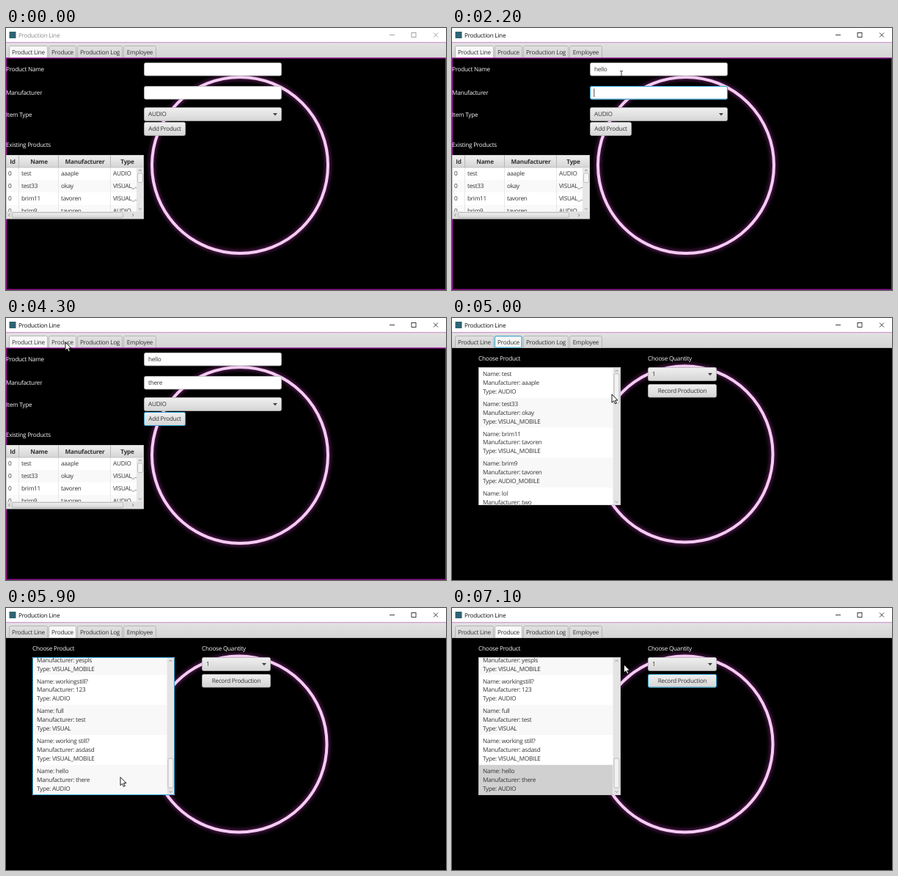
Write an HTML page that moves like this. It is 600 by 357 pixels and loops after 7.2 s.

```html
<!DOCTYPE html>
<html lang="en">
<head>
<meta charset="utf-8">
<title>Production Line</title>
<style>
  html, body { margin: 0; width: 100%; height: 100%; overflow: hidden; background: #000; }
  #stage { display: block; width: 100vw; height: 100vh; }
  text { font: 8.2px "Open Sans", "Noto Sans", sans-serif; letter-spacing: -.25px; fill: #333;
    white-space: pre; text-rendering: geometricPrecision; }
  .light { fill: #f4f4f4; }
  .bold { font-weight: 700; }
  .mid { text-anchor: middle; }
  .ring { fill: none; stroke: #f5cdf2; stroke-width: 4; filter: drop-shadow(0 0 3px #a436a0); }
  .focus { fill: none; stroke: #2aa5d4; stroke-width: 1; }
</style>
</head>
<body>
<svg id="stage" viewBox="0 0 600 357" preserveAspectRatio="none">
  <defs>
    <linearGradient id="btn" x2="0" y2="1"><stop stop-color="#f0f0f0"/><stop offset="1" stop-color="#d5d5d5"/></linearGradient>
    <linearGradient id="btnHover" x2="0" y2="1"><stop stop-color="#fafafa"/><stop offset="1" stop-color="#e2e2e2"/></linearGradient>
    <linearGradient id="bar" x2="0" y2="1"><stop stop-color="#e2e2e2"/><stop offset="1" stop-color="#d4d4d4"/></linearGradient>
    <linearGradient id="tab" x2="0" y2="1"><stop stop-color="#e0e0e0"/><stop offset="1" stop-color="#d4d4d4"/></linearGradient>
  </defs>
</svg>
<script>
const LOOP = 7200, STEP = 100;
const stage = document.getElementById('stage');
const el = id => document.getElementById(id);
const show = (id, on) => el(id).setAttribute('display', on ? 'inline' : 'none');
const set = (id, name, value) => el(id).setAttribute(name, value);

// ---- markup helpers ----
const text = (x, y, s, cls = '', id = '') => `<text x="${x}" y="${y}" class="${cls}" id="${id}">${s}</text>`;
const rect = (x, y, w, h, fill, more = '') => `<rect x="${x}" y="${y}" width="${w}" height="${h}" fill="${fill}" ${more}/>`;
const line = (d, color, width = 1, more = '') => `<path d="${d}" fill="none" stroke="${color}" stroke-width="${width}" ${more}/>`;
const clip = (x, y, w, h, body) => `<svg x="${x}" y="${y}" width="${w}" height="${h}" viewBox="${x} ${y} ${w} ${h}">${body}</svg>`;
const box = (x, y, w, h, fill, id = '') => rect(x + .5, y + .5, w - 1, h - 1, fill, `rx="2" stroke="#b4b4b4" stroke-width=".8" id="${id}"`);
const halo = (x, y, w, h, id) => rect(x + .5, y + .5, w - 1, h - 1, 'none', `rx="2" class="focus" id="${id}"`);
const chevron = (x, y, dx, dy) => line(dx
  ? `M${x - dx},${y - 2}l${2 * dx},2l${-2 * dx},2`
  : `M${x - 2},${y - dy}l2,${2 * dy}l2,${-2 * dy}`, '#777', .8);
const combo = (x, y, w, h, s) => box(x, y, w, h, 'url(#btn)') + text(x + 6, y + 12.3, s) +
  `<path d="M${x + w - 12},${y + 8}h6l-3,3.6z" fill="#444"/>`;
const button = (x, y, w, h, s, id) => box(x, y, w, h, 'url(#btn)', id) +
  halo(x, y, w, h, id + 'Focus') + text(x + w / 2, y + 12.2, s, 'mid');

// ---- window chrome ----
const TABS = [['Product Line', 4, 53], ['Produce', 58, 38], ['Production Log', 97, 62], ['Employee', 160, 45]];

const chrome = () => rect(0, 0, 600, 19, '#fff') + rect(0, 20, 600, 21, 'url(#bar)') +
  rect(0, 19, 600, 1.3, '#d39fd4') +
  rect(4.5, 5, 9, 9, '#2f6374') + text(17, 12.5, 'Production Line', '', 'title') +
  `<g id="winBtns" fill="none" stroke-width=".8"><path d="M523,9.5h7M583,6.5l6,6M589,6.5l-6,6"/><rect x="553" y="6.5" width="6" height="6"/></g>` +
  line('M0,40.5H600', '#b5b5b5') +
  TABS.map(([name, x, w], i) =>
    `<path id="tab${i}" d="M${x + .5},40.5v-14q0,-2 2,-2h${w - 5}q2,0 2,2v14" stroke="#b2b2b2" stroke-width=".9"/>` +
    text(x + w / 2, 36, name, 'mid')).join('') +
  rect(58.5, 24.8, 36.5, 15.4, 'none', 'rx="1.5" class="focus" id="tabFocus"');

// ---- first page ----
const ROWS = [['test', 'aaaple', 'AUDIO'], ['test33', 'okay', 'VISUAL_...'],
  ['brim11', 'tavoren', 'VISUAL_...'], ['brim9', 'tavoren', 'AUDIO_...']];
const COLS = [['Id', 0, 18], ['Name', 18, 54], ['Manufacturer', 72, 71], ['Type', 143, 45]];
const FIELDS = [47, 79];

function table() {
  const head = COLS.map(([name, x, w]) => text(x + w / 2, 184.7, name, 'mid bold') +
    line(`M${x + w - .5},173V190`, '#b8b8b8')).join('');
  const rows = ROWS.map((row, i) => {
    const y = 190 + i * 17;
    return rect(0, y, 178, 17, i % 2 ? '#f9f9f9' : '#fff') +
      line(`M17.5,${y}v17M71.5,${y}v17M142.5,${y}v17`, '#e8e8e8') +
      ['0', ...row].map((s, c) => text(COLS[c][1] + 3, y + 11, s)).join('');
  }).join('');
  return rect(0, 173, 188, 87, '#fff') + rect(0, 173, 188, 17, 'url(#btn)') + head +
    clip(0, 190, 178, 60, rows) + line('M0,190H188', '#b8b8b8', .8) +
    rect(178, 190, 10, 60, '#e6e6e6') + rect(179.5, 198, 7, 12.5, '#f4f4f4', 'rx="1.5" stroke="#b4b4b4" stroke-width=".8"') +
    chevron(183, 194, 0, -1) + chevron(183, 246.5, 0, 1) +
    rect(0, 250, 188, 10, '#e0e0e0') + rect(8.5, 251.5, 151, 7, 'url(#btn)', 'rx="1.5" stroke="#b4b4b4" stroke-width=".8"') +
    chevron(4.5, 255, -1, 0) + chevron(173, 255, 1, 0) +
    rect(.5, 173.5, 187, 86.5, 'none', 'stroke="#c4c4c4" stroke-width=".8"');
}

const formPage = () => `<g id="form">` + rect(0, 41, 600, 316, '#000') +
  `<circle class="ring" cx="319" cy="187" r="120"/>` +
  rect(.5, 41, 599, 315.3, 'none', 'stroke="#a010a0" stroke-width="1.2"') +
  text(0, 59, 'Product Name', 'light') + text(0, 91, 'Manufacturer', 'light') +
  text(0, 120.5, 'Item Type', 'light') + text(0, 162, 'Existing Products', 'light') +
  FIELDS.map((y, i) => box(188, y, 188, 18.5, '#fff') + halo(188, y, 188, 18.5, 'field' + i) +
    text(194, y + 12, '', '', 'typed' + i)).join('') +
  `<path id="caret" fill="none" stroke="#222" stroke-width=".8"/>` +
  combo(188, 108, 188, 19, 'AUDIO') + button(188, 128, 57, 19, 'Add Product', 'add') + table() + `</g>`;

// ---- second page ----
const A = 'AUDIO', V = 'VISUAL', AM = 'AUDIO_MOBILE', VM = 'VISUAL_MOBILE';
const ITEMS = [['test', 'aaaple', A], ['test33', 'okay', VM], ['brim11', 'tavoren', VM], ['brim9', 'tavoren', AM],
  ['lol', 'two', A], ['three', 'four', V], ['abc', 'test', A], ['five', 'six', AM], ['again', 'asd', VM], ['new', 'test', A],
  ['qwe', 'rty', V], ['item', 'maker', A], ['test4', 'okay', AM], ['more', 'asdf', VM], ['try', 'test', A],
  ['pls', 'yespls', VM], ['workingstill?', '123', A], ['full', 'test', V], ['working still?', 'asdasd', VM], ['hello', 'there', A]];
const CELL = 40.75, VIEW = { x: 37, y: 68, w: 182.5, h: 186.5 }, ODD_CELL = '#f9f8f9';
const MAX_SCROLL = ITEMS.length * CELL - VIEW.h, THUMB = { top: 76, travel: 129 };

const item = ([name, maker, type], i) => {
  const y = VIEW.y + i * CELL;
  const last = i === ITEMS.length - 1;
  return `<g id="${last ? 'lastItem' : ''}">` + rect(VIEW.x, y, VIEW.w, CELL, i % 2 ? ODD_CELL : '#fff', last ? 'id="lastBack"' : '') +
    ['Name: ' + name, 'Manufacturer: ' + maker, 'Type: ' + type]
      .map((s, k) => text(42, y + 11 + k * 11.9, s)).join('') + `</g>`;
};

const producePage = () => `<g id="produce">` + rect(0, 41, 600, 316, '#000') +
  `<circle class="ring" cx="317.5" cy="185.5" r="120"/>` +
  text(36, 58.3, 'Choose Product', 'light') + text(267, 58.3, 'Choose Quantity', 'light') +
  rect(36.5, 67.5, 193, 187, '#fff', 'stroke="#bdbdbd"') +
  clip(VIEW.x, VIEW.y, VIEW.w, VIEW.h, `<g id="items">${ITEMS.map(item).join('')}</g>`) +
  rect(219.5, 68, 10, 186.5, '#e4e4e4') + chevron(224.5, 72, 0, -1) + chevron(224.5, 250.5, 0, 1) +
  rect(221, THUMB.top, 7, 40, '#f2f2f2', 'rx="1.5" stroke="#adadad" stroke-width=".8" id="thumb"') +
  halo(36, 67, 194, 188, 'listFocus') +
  combo(267, 67, 94, 19, '1') + button(267, 90, 94, 18.5, 'Record Production', 'record') + `</g>`;

const cursors = () =>
  `<path id="arrow" d="M0,0V11.2L2.6,8.8L4.4,12.8L6.3,12L4.5,8.1H8Z" fill="#fff" stroke="#000" stroke-width=".9"/>` +
  `<path id="beam" d="M-2,-3.3h1.4l.6,.5l.6,-.5h1.4M0,-3V3.2M-2,3.5h1.4l.6,-.5l.6,.5h1.4" fill="none" stroke="#222" stroke-width=".9"/>`;

stage.insertAdjacentHTML('beforeend', chrome() + formPage() + producePage() + cursors());

// ---- timeline ----
const CLICK_FIELD = 700, TAB_KEY = 2000, CLICK_ADD = 3600, CLICK_TAB = 4400,
  GRAB = 5100, DROP = 5600, CLICK_ITEM = 6000, CLICK_RECORD = 6600;
const KEYS = [['hello', [1300, 1400, 1600, 1700, 1800]], ['there', [2300, 2400, 2500, 2700, 2700]]];
// pointer stops: time, x, y
const PATH = [[100, 400, 350], [600, 231, 62], [3000, 231, 62], [3500, 226, 139], [3700, 226, 139], [4200, 81, 33],
  [4500, 81, 33], [5000, 218, 104], [GRAB, 223, 104], [DROP, 223, 233], [5900, 156, 230.5],
  [6100, 156, 230.5], [6500, 290, 101], [6700, 290, 101], [6900, 244, 82], [7100, 234.5, 77]];

const ease = u => u * u * (3 - 2 * u);
const span = (t, a, b) => ease(Math.min(1, Math.max(0, (t - a) / (b - a))));

function pointer(t) {
  const n = PATH.findIndex(p => p[0] > t);
  if (n < 1) return n ? PATH[PATH.length - 1].slice(1) : PATH[0].slice(1);
  const [a, b] = [PATH[n - 1], PATH[n]], u = span(t, a[0], b[0]);
  return [a[1] + (b[1] - a[1]) * u, a[2] + (b[2] - a[2]) * u];
}
const inside = ([px, py], x, y, w, h) => px >= x && px <= x + w && py >= y && py <= y + h;

function drawForm(t, p) {
  const active = t < CLICK_FIELD || t >= CLICK_ADD ? -1 : t < TAB_KEY ? 0 : 1;
  KEYS.forEach(([word, times], i) => {
    el('typed' + i).textContent = word.slice(0, times.filter(k => k <= t).length);
    show('field' + i, active === i);
  });
  if (active >= 0) {
    const since = Math.max(active ? TAB_KEY : CLICK_FIELD, ...KEYS[active][1].filter(k => k <= t));
    const x = 193.8 + el('typed' + active).getComputedTextLength(), y = FIELDS[active] + 3.5;
    set('caret', 'd', `M${x},${y}v11.5`);
    show('caret', (t - since) % 1000 < 500);
  } else show('caret', false);
  show('addFocus', t >= CLICK_ADD);
  set('add', 'fill', inside(p, 188, 128, 57, 19) ? (t === CLICK_ADD ? '#cfcfcf' : 'url(#btnHover)') : 'url(#btn)');
}

function drawProduce(t, p) {
  const u = span(t, GRAB, DROP);
  set('items', 'transform', `translate(0 ${-u * MAX_SCROLL})`);
  set('thumb', 'y', THUMB.top + u * THUMB.travel);
  const picked = t >= CLICK_ITEM, focused = t >= GRAB && t < CLICK_RECORD;
  set('lastBack', 'fill', !picked ? ODD_CELL : focused ? '#0096c9' : '#d0d0d0');
  el('lastItem').querySelectorAll('text').forEach(n => n.style.fill = picked && focused ? '#fff' : '#333');
  show('listFocus', focused);
  show('recordFocus', t >= CLICK_RECORD);
  set('record', 'fill', inside(p, 267, 90, 94, 18) ? (t === CLICK_RECORD ? '#cfcfcf' : 'url(#btnHover)') : 'url(#btn)');
}

function draw(t) {
  const p = pointer(t), page = t < CLICK_TAB ? 0 : 1, awake = t >= CLICK_FIELD;
  el('title').style.fill = awake ? '#111' : '#8c8c8c';
  set('winBtns', 'stroke', awake ? '#111' : '#8c8c8c');
  TABS.forEach(([, x, w], i) =>
    set('tab' + i, 'fill', i === page ? '#f7f7f7' : inside(p, x, 24, w, 16) ? '#e6e6e6' : 'url(#tab)'));
  show('tabFocus', page === 1 && t < GRAB);
  show('form', page === 0);
  show('produce', page === 1);
  if (page) drawProduce(t, p); else drawForm(t, p);
  const beam = page === 0 && FIELDS.some(y => inside(p, 188, y, 188, 18));
  show('beam', beam);
  show('arrow', !beam && t >= PATH[0][0]);
  set(beam ? 'beam' : 'arrow', 'transform', `translate(${p})`);
}

const start = performance.now();
function tick() {
  const t = (performance.now() - start) % LOOP;
  draw(Math.floor(t / STEP) * STEP);
  requestAnimationFrame(tick);
}
tick();
</script>
</body>
</html>
```
